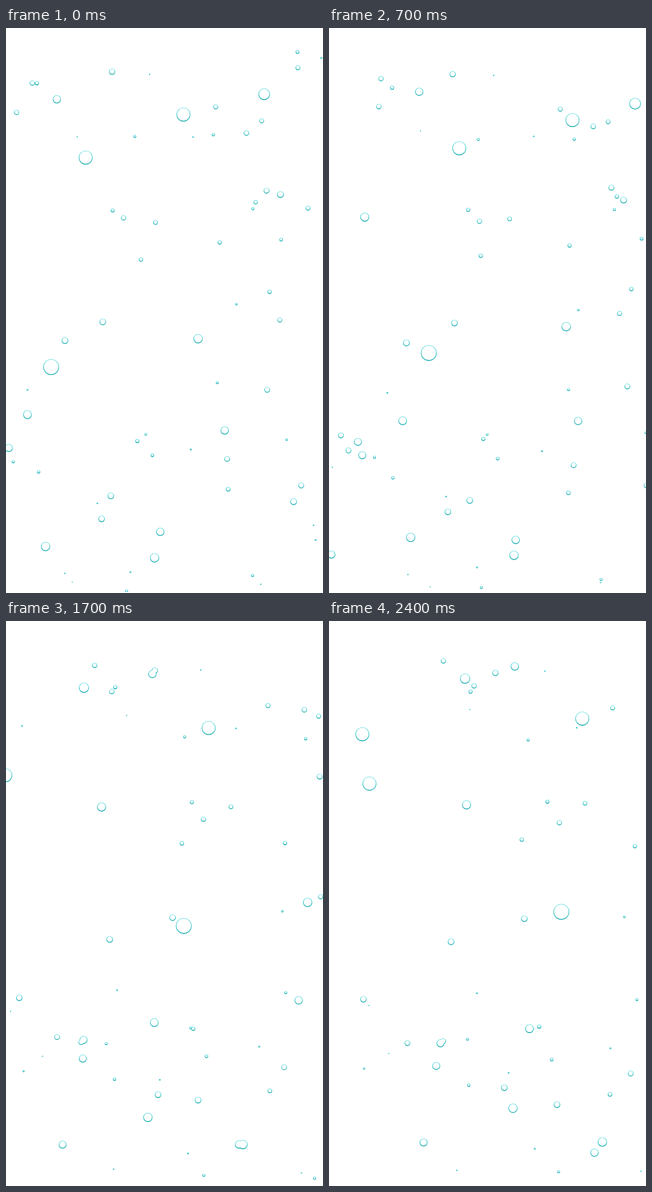
Write an HTML page with a canvas that moves like this. It is 561 px wide and 998 px high and loops after 2.5 s.

```html
<!DOCTYPE html>
<html lang="en">
<head>
<meta charset="utf-8">
<title>Rising bubbles</title>
<style>
  html, body { margin: 0; width: 100%; height: 100%; overflow: hidden; background: #fff; }
  canvas { display: block; }
</style>
</head>
<body>
<canvas id="stage" width="561" height="998"></canvas>
<script>
const ctx = document.getElementById('stage').getContext('2d');
const W = 561, H = 998, LOOP = 2500, STEP = 100;
const bubbles = [];

function add(r, x, y, vx, vy) {
  bubbles.push({ r, x, y, vx, vy });
}

// the largest bubbles: radius, place, speed per second
add(14, 80, 599, 138, -35.5);
add(12.3, 314, 153, 167, 14);
add(12.3, 141, 229, 128, -23.5);
add(12.3, -178, 237, 104, 21);
add(12.3, -217, 284, 115, -35);
add(10.3, 457, 117, 121, 24);
add(9, -112, 157, 147, -23);
add(8.2, 340, 549, 114, -30.5);
add(8.2, 70, 916, 106.5, -23);
add(8.2, 263, 936, 92, -6.5);
add(8, -11, 338, 106, -5.5);
add(7.7, 38, 683, 132, 15.5);
add(7.3, 387, 711, 77, -24);
add(7.3, 273, 890, 82, 20.5);
add(7.3, 90, 126, 99.5, -19);
add(7, 5, 742, 77, 18.3);
add(7, -9, 725, 86, 8.8);
add(7, -63, 934, 96, -5.3);

let seed = 41;
function rnd(lo, hi) {
  seed = (seed * 16807) % 2147483647;
  return lo + (hi - lo) * seed / 2147483647;
}

// small bubbles drift between them
for (let i = 0; i < 66; i++) {
  add(rnd(1, 6), rnd(-170, W), rnd(30, H), rnd(40, 100), rnd(-18, 18));
}

function disc(x, y, r) {
  ctx.beginPath();
  ctx.arc(x, y, r, 0, Math.PI * 2);
  ctx.fill();
}

function rim(y, r) {
  const g = ctx.createLinearGradient(0, y - r, 0, y + r);
  g.addColorStop(0, '#58dce0');
  g.addColorStop(1, '#22aeb2');
  return g;
}

function draw(t) {
  ctx.fillStyle = '#fff';
  ctx.fillRect(0, 0, W, H);
  ctx.save();
  ctx.beginPath();
  ctx.rect(0, 2, W, H - 4);
  ctx.clip();
  const now = bubbles.map(b => ({ r: b.r, x: b.x + b.vx * t, y: b.y + b.vy * t }));
  for (const { x, y, r } of now) {
    ctx.fillStyle = rim(y, r);
    disc(x, y, r);
  }
  // insides come last, so touching bubbles share one outline
  ctx.fillStyle = '#fff';
  for (const { x, y, r } of now) {
    if (r > 1.3) disc(x, y - 0.4, r - 1.15);
  }
  ctx.restore();
}

function tick() {
  const ms = performance.now() % LOOP;
  draw(Math.floor(ms / STEP) * STEP / 1000);
  requestAnimationFrame(tick);
}
tick();
</script>
</body>
</html>
```
